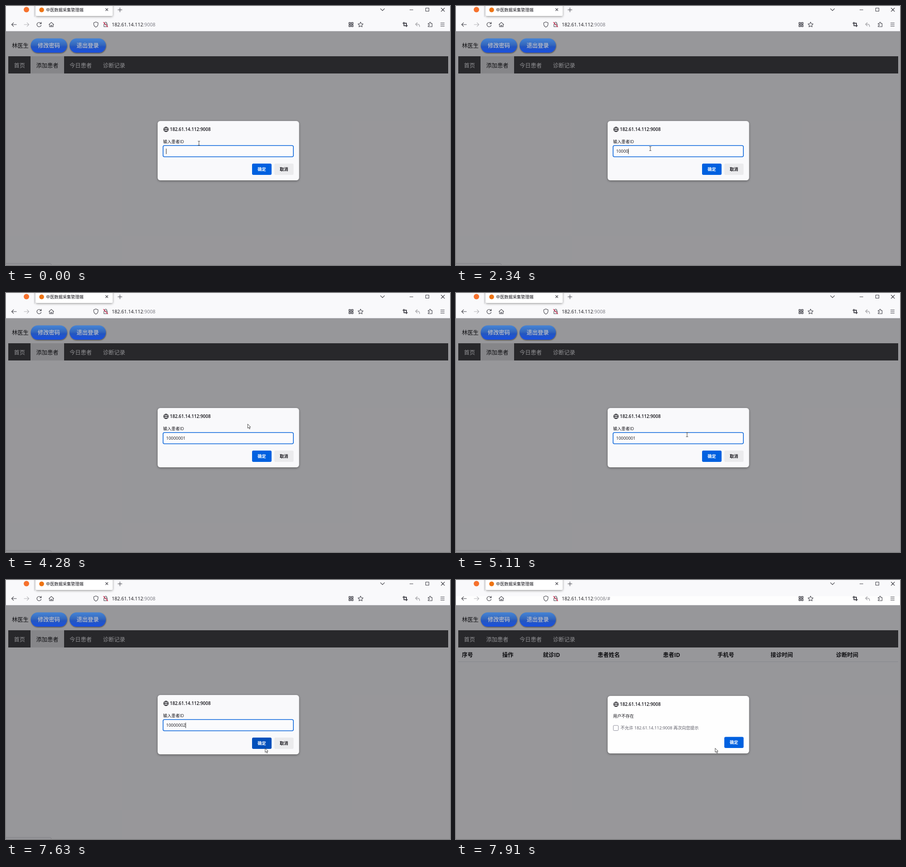
Recreate the animation shown at these times as an HTML page. Size 978 by 572 pixels, loop 8 s.

```html
<!DOCTYPE html>
<html lang="zh-CN">
<head>
<meta charset="utf-8">
<title>中医数据采集管理端</title>
<style>
  html, body { margin: 0; width: 100%; height: 100%; overflow: hidden; background: #fdfdfd; }
  svg { display: block; width: 978px; height: 572px; }
  text { font-family: "Open Sans", "Noto Sans CJK SC", "Noto Sans CJK", sans-serif; white-space: pre; }
  .icon { fill: none; stroke: #45454d; stroke-width: 1.1; stroke-linecap: round; stroke-linejoin: round; }
  .pale { stroke: #b4b4b8; }
</style>
</head>
<body>
<svg viewBox="0 0 978 572">
  <defs>
    <linearGradient id="bright" x2="0" y2="1">
      <stop offset="0" stop-color="#4a9cff"/><stop offset=".28" stop-color="#3f8cff"/>
      <stop offset=".3" stop-color="#2f78ff"/><stop offset=".6" stop-color="#1f66ff"/>
      <stop offset=".65" stop-color="#0f52fb"/><stop offset="1" stop-color="#0c4cf5"/>
    </linearGradient>
    <linearGradient id="dim" x2="0" y2="1">
      <stop offset="0" stop-color="#4684d6"/><stop offset=".45" stop-color="#3468bd"/>
      <stop offset=".6" stop-color="#2355c0"/><stop offset="1" stop-color="#1c50e0"/>
    </linearGradient>
    <filter id="soft" x="-20%" y="-30%" width="140%" height="170%">
      <feDropShadow dx="0" dy="1.5" stdDeviation="2.5" flood-color="#000" flood-opacity=".4"/>
    </filter>
    <filter id="lift" x="-20%" y="-30%" width="140%" height="170%">
      <feDropShadow dx=".5" dy="1.5" stdDeviation="1.1" flood-color="#000" flood-opacity=".5"/>
    </filter>
  </defs>

  <!-- page -->
  <rect width="978" height="572" fill="#fdfdfd"/>
  <g id="page">
    <rect x="5" y="111" width="969" height="38" fill="#333"/>
    <rect id="hover" x="54" y="111" width="74" height="38" fill="#ddd"/>
  </g>
  <g id="table"><path d="M5 180.5H974" stroke="#dfe1e4"/></g>
  <path id="status" d="M0 568.5H97.5Q99.5 568.5 99.5 570.5V573H0" fill="#f9f9fb" stroke="#d2d2d6"/>
  <rect id="shade" y="56" width="978" height="516" fill="#1c1b22" fill-opacity=".45"/>
  <g id="pills"></g>

  <!-- browser chrome -->
  <rect width="978" height="56" fill="#f9f9fb"/>
  <rect id="bar" y="36" width="978" height="20" fill="#fefefe"/>
  <path d="M0 55.5H978" stroke="#d0d0d4"/>
  <path d="M62.5 0V24" stroke="#d3d3d8"/>
  <rect x="65.500" y="-8" width="169.500" height="30" rx="3" fill="#fff" filter="url(#soft)"/>
  <circle cx="45" cy="8" r="6" fill="#f6712d"/>
  <circle cx="78.500" cy="8.500" r="5.300" fill="#ed7414"/>
  <g id="chrome" class="icon">
    <path d="M219.500 5.500l5 5m0-5l-5 5M246.500 8.500h9M251 4v9M825 6l4.300 4.300L833.600 6M889.500 8.500h7M924.500 4.500h7v7h-7zM958.500 4.500l7.500 7.500m0-7.500l-7.500 7.500"/>
    <path d="M23 41H12.500m4.200-4.200L12.500 41l4.200 4.200"/>
    <path class="pale" d="M40 41h10.500m-4.200-4.200L50.500 41l-4.200 4.200"/>
    <path d="M76.800 38.200A4.800 4.800 0 1 0 77.500 42.500M77.800 35.800v3.300h-3.400"/>
    <path d="M94.700 41l5.200-4.900 5.200 4.900M95.800 40.300v5.500h8.200v-5.500M98.600 45.800v-3.300h2.600v3.300"/>
    <path d="M198 35.300l4.700 1.600v3.300q0 4-4.700 6.500q-4.700-2.500-4.700-6.500v-3.300z"/>
    <path d="M215.700 40.200h7.500v5.600h-7.500zM217 40v-1.800a2.500 2.500 0 0 1 5 0V40"/>
    <path d="M214.700 36l9.300 10" stroke="#e22850" stroke-width="1.300"/>
    <path d="M755.500 36.500h3.500v3.500h-3.500zM761 36.500h3.500v3.500H761zM755.500 42h3.500v3.500h-3.500zM761 42h3.500v3.500H761z" stroke-width="1.400"/>
    <path d="M781 35.500l1.700 3.500 3.900.5-2.800 2.700.7 3.900-3.500-1.900-3.500 1.900.7-3.900-2.800-2.700 3.900-.5z"/>
    <path d="M876.500 36v7.500h7.500M874.500 38h7.500v7.500" stroke-width="1.900"/>
    <path class="pale" d="M905.800 37l-3.800 3.400 3.800 3.400M902.500 40.400h4.500q4 0 4 5" stroke-width="1.700"/>
    <path d="M930 38.500h2.700v-1.200a1.500 1.500 0 0 1 3 0v1.200h2.800v7.300H930v-2.300h1.200a1.500 1.500 0 0 0 0-3H930z"/>
    <path d="M957.500 37.500h8M957.500 41h8M957.500 44.500h8"/>
  </g>

  <!-- dialogs -->
  <g id="prompt">
    <rect x="334" y="254" width="311.500" height="131" rx="6" fill="#f9f9fb" filter="url(#soft)"/>
    <rect x="346" y="308.200" width="287" height="24.800" rx="3" fill="#fbfbfd" stroke="#0a66dc" stroke-width="1.600"/>
    <rect id="ok" x="542" y="348" width="43" height="25" rx="3"/>
    <rect x="591" y="348" width="42.500" height="25" rx="3" fill="#ebebed"/>
    <rect id="caret" x="352.500" y="315" width="1" height="12" fill="#222"/>
  </g>
  <g id="alert">
    <rect x="334" y="256" width="311.500" height="127" rx="6" fill="#fefefe" filter="url(#soft)"/>
    <rect x="346.500" y="321.200" width="11" height="11.300" rx="1.800" fill="#fff" stroke="#8f8f9d"/>
    <rect x="591" y="346.500" width="42.500" height="24.500" rx="3" fill="#0061e0"/>
  </g>

  <g id="pointer">
    <path id="arrow" d="M.4.4V9.600L2.500 7.700 4.100 11.300 5.700 10.600 4.100 7.200H6.800z" fill="#fff" stroke="#222" stroke-width=".8"/>
    <path id="beam" d="M-2.300-4.500H-.6Q0-4.500 0-3.900Q0-4.500.6-4.500H2.300M0-4V4M-2.300 4.500H-.6Q0 4.500 0 3.900Q0 4.500.6 4.500H2.300" fill="none" stroke="#333" stroke-width=".9"/>
  </g>
</svg>
<script>
const LOOP = 8000, SENT = 7780, ALERT = 7910;
const HOST = "182.61.14.112", SITE = HOST + ":9008";
const $ = id => document.getElementById(id);

function add(parent, tag, attrs) {
  const el = document.createElementNS("http://www.w3.org/2000/svg", tag);
  for (const key in attrs) el.setAttribute(key, attrs[key]);
  return parent.appendChild(el);
}

// Places text by its left edge and the middle of its line.
function label(parent, text, x, mid, size, fill = "#000", weight = 400) {
  const el = add(parent, "text", {
    x, y: mid + size * .37, "font-size": size, fill, "font-weight": weight, stroke: "none"
  });
  el.textContent = text;
  return el;
}

function globe(parent, y) {
  add(parent, "path", {
    class: "icon", style: "stroke:#15141a",
    d: `M347.300 ${y}a5.200 5.200 0 1 0 10.400 0a5.200 5.200 0 1 0 -10.400 0h10.400` +
       `M352.500 ${y - 5.2}q-5 5.200 0 10.400q5 -5.200 0 -10.400`
  });
  label(parent, SITE, 361, y, 9.9, "#15141a", 600);
}

// Page
label($("page"), "林医生", 13, 87.5, 12.25);
const nav = [["首页", 17.5], ["添加患者", 66.5], ["今日患者", 140], ["诊断记录", 213.5]]
  .map(([text, x]) => label($("page"), text, x, 131, 12.25, "#f2f2f2"));
[["序号", 13], ["操作", 102], ["就诊ID", 191.5], ["患者姓名", 312], ["患者ID", 456],
 ["手机号", 576], ["接诊时间", 693], ["诊断时间", 837]]
  .forEach(([text, x]) => label($("table"), text, x, 165, 12.25, "#000", 700));

const pills = [["修改密码", 54.5], ["退出登录", 140]].map(([text, x]) => ({
  box: add($("pills"), "rect", { x, y: 71.5, width: 80, height: 31.5, rx: 15.7, filter: "url(#lift)" }),
  text: label($("pills"), text, x + 15.5, 87.5, 12.25, "#fff", 700)
}));

// Chrome
label($("chrome"), "中医数据采集管理端", 88, 8.5, 9.2, "#15141a");
label($("chrome"), HOST, 233, 41, 10.6, "#15141a");
const tail = label($("chrome"), "", 302, 41, 10.6, "#77777f");

// Dialogs
globe($("prompt"), 272.5);
label($("prompt"), "输入患者ID", 346, 299.5, 9.2, "#15141a");
const field = label($("prompt"), "", 352.7, 320.5, 9.35, "#15141a");
label($("prompt"), "确定", 554.3, 361, 9.2, "#fff", 700);
label($("prompt"), "取消", 603, 361, 9.2, "#15141a", 700);
globe($("alert"), 274.5);
label($("alert"), "用户不存在", 346, 301, 9.2, "#15141a");
label($("alert"), `不允许 ${SITE} 再次向您提示`, 362.5, 327, 9.25, "#5b5b66");
label($("alert"), "确定", 603, 359, 9.2, "#fff", 700);

// Steps: each value holds until the next time.
const keys = [980, 1260, 1820, 2090, 2340, 2610, 2920, 3450];
const blinks = [150, 700, 3850, 4430, 4990, 5570, 6000, 6840, 7120, 7510];
const moves = [
  [0, 425, 303, "beam"], [150, 428, 315, "beam"],
  [4000, 400, 263, "arrow"], [4150, 480, 272, "arrow"], [4280, 532, 289, "arrow"],
  [4430, 544, 301, "beam"], [4590, 520, 312, "beam"], [4990, 509, 313, "beam"],
  [7120, 517, 312, "beam"], [7270, 578, 335, "arrow"], [7390, 584, 362, "arrow"],
  [7510, 584, 374, "arrow"], [7630, 570.5, 371, "arrow"]
];

const passed = (times, t) => times.filter(at => at <= t).length;
const show = (id, on) => $(id).setAttribute("display", on ? "inline" : "none");

function typed(t) {
  const text = "10000001".slice(0, passed(keys, t));
  return t < 6560 ? text : text.slice(0, 7) + (t < 6840 ? "" : "2");
}

function draw(t) {
  const sent = t >= SENT, alerting = t >= ALERT, shaded = !sent || alerting;
  const value = typed(t);
  const [, x, y, shape] = moves[passed(moves.map(m => m[0]), t) - 1];

  show("prompt", !sent);
  show("alert", alerting);
  show("table", sent);
  show("bar", sent);
  show("hover", !sent);
  show("shade", shaded);
  show("status", !alerting);
  nav[1].setAttribute("fill", sent ? "#f2f2f2" : "#000");
  tail.textContent = sent ? ":9008/#" : ":9008";
  for (const { box, text } of pills) {
    box.setAttribute("fill", shaded ? "url(#dim)" : "url(#bright)");
    text.setAttribute("fill", shaded ? "#aab2c6" : "#fff");
  }

  field.textContent = value;
  show("caret", passed(blinks, t) % 2 === 0);
  $("caret").setAttribute("x", 352.5 + value.length * 5.35);
  const over = x >= 542 && x <= 585 && y >= 348 && y <= 373;
  $("ok").setAttribute("fill", over ? "#0250bb" : "#0061e0");

  $("pointer").setAttribute("transform", `translate(${x} ${y})`);
  show("arrow", shape === "arrow");
  show("beam", shape === "beam");
}

const start = performance.now();
function tick() {
  draw((performance.now() - start) % LOOP);
  requestAnimationFrame(tick);
}
tick();
</script>
</body>
</html>
```
